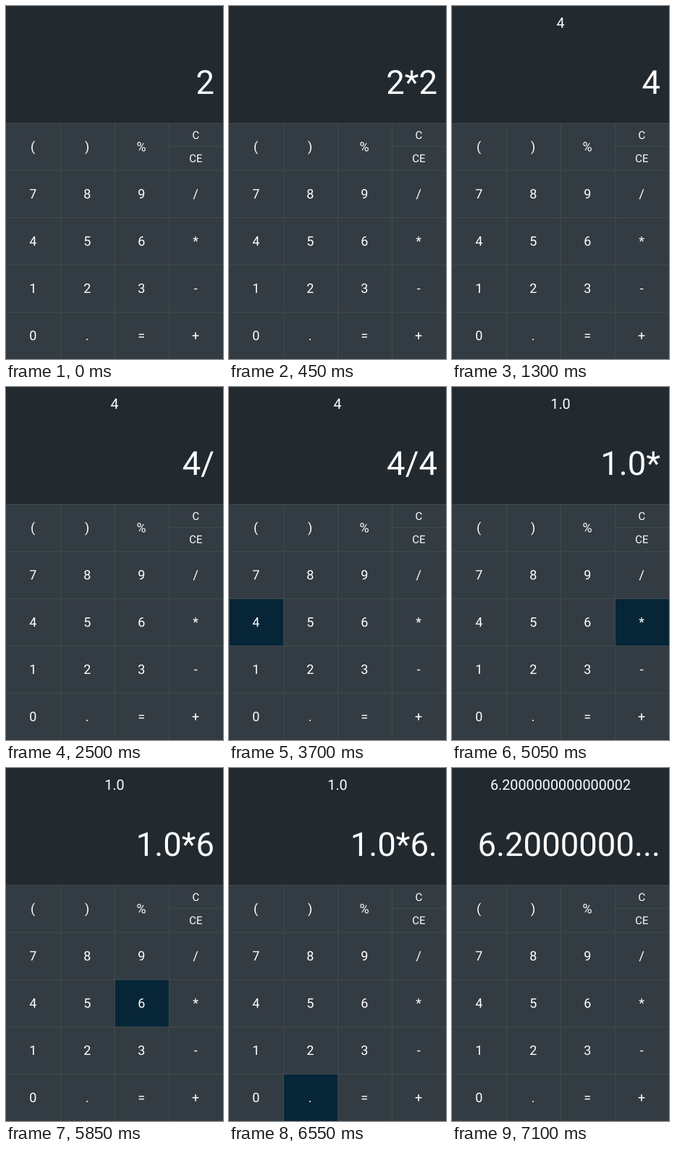
Write an HTML page that moves like this. It is 300 px wide and 486 px high and loops after 8000 ms.

```html
<!DOCTYPE html>
<html lang="en">
<head>
<meta charset="utf-8">
<title>Calculator</title>
<style>
  html, body { margin: 0; width: 100%; height: 100%; overflow: hidden; background: #222a30; }
  svg { display: block; width: 100%; height: 100%; }
  text { font-family: Roboto, "Liberation Sans", sans-serif; fill: #fff; text-rendering: geometricPrecision; }
  .screen { fill: #222a30; }
  .pad { fill: #343c43; }
  .line { fill: #3e4a4e; }
  #press { fill: #062537; }
  #entry { font-size: 45.5px; text-anchor: end; }
  #result { font-size: 19.8px; text-anchor: middle; }
  #labels { font-size: 18px; text-anchor: middle; }
  #labels .small { font-size: 15px; }
</style>
</head>
<body>
<svg viewBox="0 0 300 486">
  <rect class="screen" width="300" height="161"/>
  <rect class="pad" y="161" width="300" height="325"/>
  <rect id="press" width="74" height="64"/>
  <g id="lines"></g>
  <g id="labels"></g>
  <text id="result" x="150" y="30"></text>
  <text id="entry" x="288" y="120.5"></text>
</svg>
<script>
const LOOP = 8000, COL = 75, ROW = 65, TOP = 161;
const keys = ["()%", "789/", "456*", "123-", "0.=+"];
const $ = id => document.getElementById(id);

// time, pressed key, how long it is held, entry, result
const steps = [
  [0, "", 0, "2", ""],
  [100, "*", 100, "2*", ""],
  [400, "2", 50, "2*2", ""],
  [1200, "=", 100, "4", "4"],
  [2400, "/", 100, "4/", "4"],
  [3700, "4", 50, "4/4", "4"],
  [3900, "=", 100, "1.0", "1.0"],
  [5050, "*", 100, "1.0*", "1.0"],
  [5850, "6", 100, "1.0*6", "1.0"],
  [6550, ".", 100, "1.0*6.", "1.0"],
  [6800, "2", 50, "1.0*6.2", "1.0"],
  [7000, "=", 100, "6.2000000...", "6.2000000000000002"]
];

function add(parent, tag, attrs, text = "") {
  const el = document.createElementNS("http://www.w3.org/2000/svg", tag);
  for (const name in attrs) el.setAttribute(name, attrs[name]);
  el.textContent = text;
  $(parent).append(el);
}

const line = (x, y, width, height) => add("lines", "rect", { class: "line", x, y, width, height });

for (let c = 1; c < 4; c++) line(c * COL, TOP, 1, 325);
for (let r = 0; r < 5; r++) line(0, TOP + r * ROW, 300, 1);
line(3 * COL, 193, COL, 1);

keys.forEach((row, r) => [...row].forEach((key, c) =>
  add("labels", "text", { x: c * COL + 37.2, y: 200.4 + r * ROW }, key)));
add("labels", "text", { class: "small", x: 262.3, y: 182.5 }, "C");
add("labels", "text", { class: "small", x: 262.3, y: 215.3 }, "CE");

function put(id, text) {
  if ($(id).textContent !== text) $(id).textContent = text;
}

function draw() {
  const t = performance.now() % LOOP;
  const [start, key, hold, entry, result] = steps.findLast(step => step[0] <= t);
  put("entry", entry);
  put("result", result);

  const held = t < start + hold;
  $("press").style.visibility = held ? "visible" : "hidden";
  if (held) {
    const r = keys.findIndex(row => row.includes(key));
    $("press").setAttribute("x", keys[r].indexOf(key) * COL + 1);
    $("press").setAttribute("y", TOP + r * ROW + 1);
  }
  requestAnimationFrame(draw);
}
draw();
</script>
</body>
</html>
```
